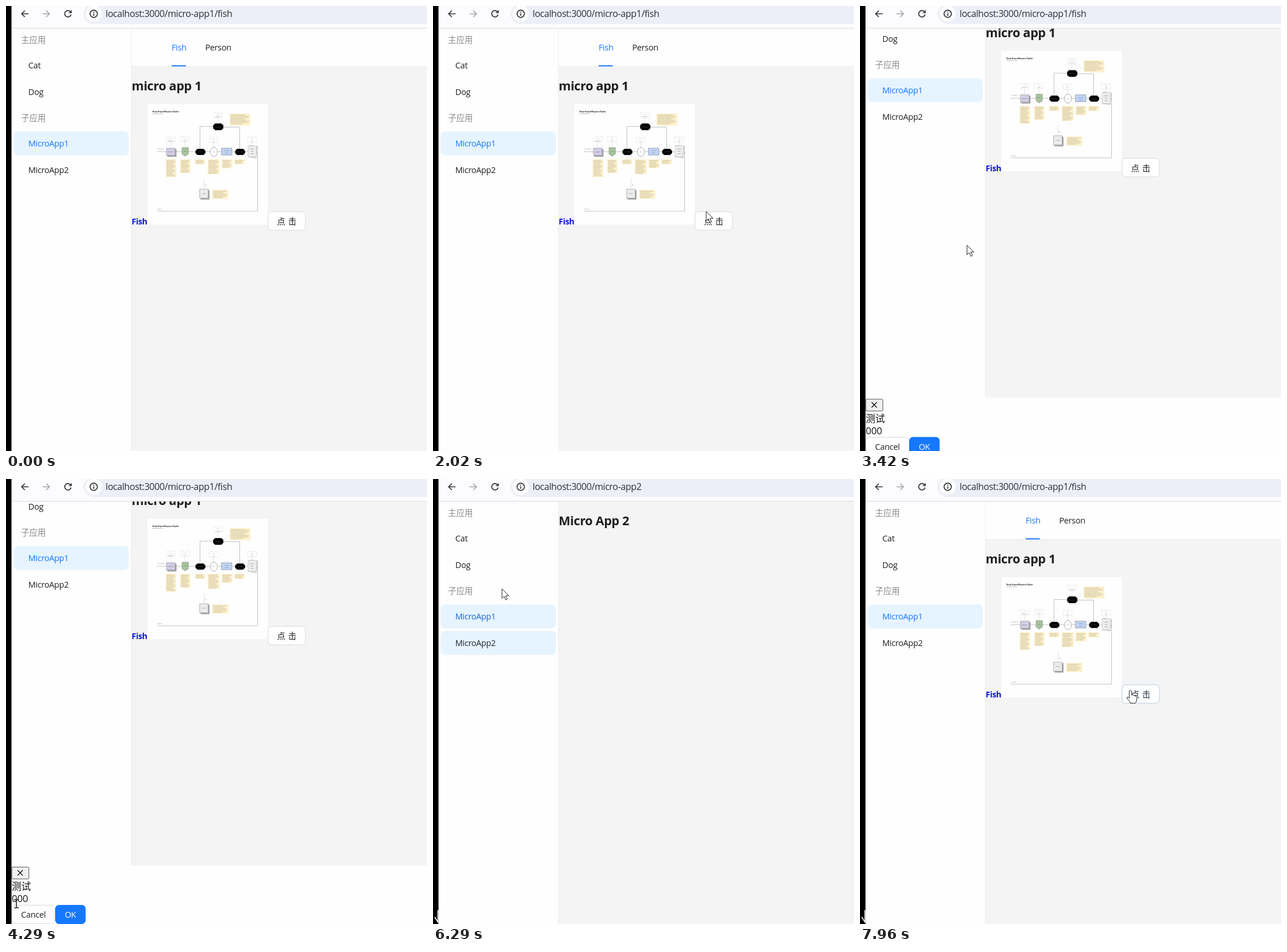
Recreate the animation shown at these times as an HTML page. Size 727 by 770 pixels, loop 8000 ms.

```html
<!DOCTYPE html>
<html lang="zh">
<head>
<meta charset="utf-8">
<style>
html, body { margin: 0; width: 100%; height: 100%; overflow: hidden; background: #fff; }
svg { display: block; width: 727px; height: 770px; }
text { font: 14.3px "Open Sans", "Noto Sans CJK SC", "Noto Sans CJK", sans-serif; letter-spacing: -.02em; fill: #1f1f1f; white-space: pre; }
.cjk { letter-spacing: 0; }
.group { fill: #8c8c8c; letter-spacing: 0; }
.head { font-size: 21.4px; font-weight: 700; letter-spacing: -.016em; }
.url { font-size: 15.9px; letter-spacing: -.0245em; fill: #303236; }
.modal { font-size: 16.5px; letter-spacing: 0; fill: #111; }
.tiny { font: 1.9px "Liberation Sans", sans-serif; letter-spacing: 0; fill: #555; }
.icon { fill: none; stroke: #303236; stroke-width: 1.7; }
.mouse { fill: #fff; stroke: #222; stroke-width: 1; stroke-linejoin: round; }
</style>
</head>
<body>
<svg viewBox="0 0 727 770">
  <rect width="727" height="770" fill="#fefefe"/>
  <g id="page">
    <rect x="217" y="38" width="510" height="732" fill="#f4f4f4"/>
    <rect x="10" y="38" width="206" height="732" fill="#fefefe"/>
    <path d="M216.5 38V770" stroke="#ececec"/>
    <text class="group" x="26" y="64">主应用</text>
    <text class="group" x="26" y="199">子应用</text>
    <g id="menu"></g>
    <g id="app1">
      <rect x="217" y="38" width="510" height="66" fill="#fefefe"/>
      <path d="M217 104.5H727" stroke="#ededed"/>
      <text x="286" y="77" style="fill:#1677ff">Fish</text>
      <text x="344" y="77">Person</text>
      <rect x="286" y="102.5" width="24.5" height="2" fill="#1677ff"/>
      <text class="head" x="217" y="146">micro app 1</text>
      <text x="217" y="378" style="fill:#0c14e0;font-weight:700;font-size:14px">Fish</text>
      <rect x="244" y="170" width="208" height="208" fill="#fefefe"/>
      <g id="chart"></g>
      <rect id="wave" fill="none" stroke="#1677ff"/>
      <rect id="btn" x="452.5" y="356" width="64.5" height="32" rx="6.5" fill="#fff"/>
      <text id="btnText" x="468" y="378" style="letter-spacing:4.9px">点击</text>
    </g>
    <text id="app2" class="head" x="217" y="80">Micro App 2</text>
    <g id="modal" transform="translate(0 101)">
      <rect x="10" y="669" width="717" height="101" fill="#fefefe"/>
      <rect x="10" y="671.5" width="29.5" height="20.5" rx="2" fill="#efefef" stroke="#555"/>
      <path d="M20 677l9 9m0-9l-9 9" stroke="#111" stroke-width="1.4"/>
      <text class="modal" x="10" y="711">测试</text>
      <text class="modal" x="10" y="732">000</text>
      <rect x="9.5" y="737.5" width="75" height="32" rx="6.5" fill="#fff" stroke="#d9d9d9"/>
      <text x="26" y="759">Cancel</text>
      <rect x="85" y="737" width="52.5" height="33" rx="6.5" fill="#1677ff"/>
      <text x="101.5" y="759" style="fill:#fff">OK</text>
    </g>
  </g>
  <rect width="727" height="38" fill="#fcfcfe"/>
  <path d="M10 38.5H727" stroke="#d9dce1"/>
  <rect x="134" y="-4" width="620" height="35" rx="17.5" fill="#eceff8"/>
  <circle cx="151.500" cy="13.500" r="14" fill="#fdfdfe"/>
  <circle id="hot" cx="107" cy="13.500" r="17.500" fill="#e6e7ea"/>
  <path class="icon" d="M39 13.500H27M32.500 8L27 13.500 32.500 19"/>
  <path class="icon" style="stroke:#a3a5a8" d="M63 13.500H75M69.500 8L75 13.500 69.500 19"/>
  <path class="icon" d="M111.700 10.400A5.600 5.600 0 1 0 112.400 14.800M112.700 7.500V11.500H108.500"/>
  <circle class="icon" cx="151.500" cy="13.500" r="6.300"/>
  <path class="icon" d="M151.500 12.700V17M151.500 9.800V11.400"/>
  <text id="url" class="url" x="172" y="19"></text>
  <rect width="9.500" height="770" fill="#000"/>
  <path id="trail" d="M8.500 746V767M3 758L9 767.500" stroke="#fff" stroke-width="1.600" fill="none"/>
  <circle id="click" r="13" fill="#f1e82a" opacity=".8"/>
  <g id="mouse" class="mouse">
    <path id="arrow" d="M0 0V16.500L3.900 12.900 6.600 19.200 9.200 18 6.500 12H11.900Z"/>
    <path id="hand" d="M-2 1Q0-2 2 1V8Q4 6 5.500 8.500 7.500 7 8.500 10 10.500 9 11 11.500V16Q10.500 20 8 22H0Q-1 19-5.500 14-7 11-4.500 11L-2 13.500Z"/>
    <path id="beam" d="M-4-7H-1L0-6 1-7H4M0-6V6M-4 7H-1L0 6 1 7H4" style="stroke-width:1.600;fill:none"/>
  </g>
</svg>
<script>
const $ = id => document.getElementById(id);
const LOOP = 8000;
const clamp = v => Math.max(0, Math.min(1, v));
const ramp = (t, a, b) => clamp((t - a) / (b - a));
const ease = k => k * k * (3 - 2 * k);
const within = (t, a, b) => t >= a && t < b;
const mix = (a, b, k) => `rgb(${a.map((v, i) => Math.round(v + (b[i] - v) * k))})`;
const show = (id, on) => $(id).setAttribute('visibility', on ? 'inherit' : 'hidden');
const attrs = (id, o) => { for (const k in o) $(id).setAttribute(k, o[k]); };

const DARK = [31, 31, 31], BLUE = [22, 119, 255], HOVER = [64, 150, 255], LINE = [217, 217, 217];

// menu
const ITEMS = ['Cat', 'Dog', 'MicroApp1', 'MicroApp2'];
const TOPS = [82, 128, 217, 263];
$('menu').innerHTML = ITEMS.map((s, i) =>
  `<rect id="bg${i}" x="13.500" y="${TOPS[i]}" width="198.500" height="41.500" rx="8" fill="#e6f4ff"/>
   <text id="item${i}" x="38.500" y="${TOPS[i] + 26}">${s}</text>`).join('');

// pipeline drawing
const rect = (x, y, w, h, fill, line = 'none') =>
  `<rect x="${x}" y="${y}" width="${w}" height="${h}" fill="${fill}" stroke="${line}" stroke-width=".6"/>`;
const path = (d, line = '#999', fill = 'none', extra = '') =>
  `<path d="${d}" stroke="${line}" fill="${fill}" stroke-width=".6" ${extra}/>`;
const word = (x, y, s, style = '') => `<text class="tiny" x="${x}" y="${y}" style="${style}">${s}</text>`;
const mid = (x, y, s, fill = '#444') => word(x, y, s, `text-anchor:middle;fill:${fill}`);
const note = (x, y, w, h) => {
  let d = '';
  for (let r = 0; 2.5 + r * 2.2 < h - 1; r++)
    d += `M${x + 2} ${y + 2.5 + r * 2.2}h${(w - 4) * (.65 + .35 * Math.abs(Math.sin(r * 2.3 + x)))}`;
  return rect(x, y, w, h, '#fdf1cf') + path(d, '#a3966f', 'none', 'stroke-dasharray="2.500 .5"');
};
const label = (x, y, s) => rect(x - 7.5, y, 15, 9.5, '#fff', '#ddd') +
  mid(x, y + 3.5, 'Optional', '#aaa') + mid(x, y + 7.5, s) +
  path(`M${x} ${y + 9.5}v9`, '#aaa', 'none', 'stroke-dasharray="1 1"');
const pill = (x, y, w, h, s) =>
  path(`M${x + 3} ${y}h${w - 6}l3 3v${h - 6}l-3 3h${6 - w}l-3-3v${6 - h}z`, '#000', '#000') + mid(x + w / 2, y + h / 2 + .7, s, '#999');
const stack = (x, y, w, h, fill, s) => rect(x + 2, y + 2, w, h, '#aaa', '#888') +
  rect(x, y, w, h, fill, '#888') + mid(x + w / 2, y + h / 2 + .7, s);

$('chart').innerHTML = [
  word(253, 184, 'Nestjs Request/Response Pipeline', 'font-size:2.8px;font-weight:700;fill:#111'),
  word(253, 187, 'Request lifecycle flow', 'fill:#333'),
  word(261, 247.5, 'Client request'), word(261, 352, 'Response'),
  path('M260 252H426M434.500 252V355H261M335 247V208.500H358M375 209.500H403.500V248'),
  path('M342 299V317', '#999', 'none', 'stroke-dasharray="1 1"'),
  path('M375 207L386 197', '#bbb', 'none', 'stroke-dasharray="1 1"'),
  [[284.5, 226, 'Middleware'], [309, 225.500, 'Guard'], [358.500, 227, 'Pipe'], [425, 226.500, 'Filter'], [366, 184, 'Interceptor']]
    .map(a => label(...a)).join(''),
  stack(277, 246, 15, 12.5, '#d3cde7', 'Middleware'),
  path('M304 245H315V256L309.500 260 304 256Z', '#777', '#a7c59c'), mid(309.5, 251.5, 'Guard'),
  pill(327.5, 247.5, 16.5, 10, 'Interceptor'),
  `<ellipse cx="359" cy="252.500" rx="6" ry="8" fill="#fff" stroke="#888" stroke-width=".7"/>`, mid(359, 253, 'Pipe'),
  rect(372, 246, 18, 12, '#bfd5f7', '#777'), mid(381, 251, 'Controller'), mid(381, 255, 'handler'),
  pill(396, 247.5, 16.5, 10, 'Interceptor'),
  path('M420 241L435 243 432 263 418 261Z', '#aaa', '#ddd'),
  rect(418, 242, 14.5, 19, '#eee', '#bbb'), mid(425, 248, 'Exception'), mid(425, 252, 'filters'), mid(425, 256, 'global'),
  pill(358, 203.5, 17, 11, 'Interceptor'),
  stack(334.5, 317, 14.5, 15.5, '#ececec', 'Provider'),
  `<circle cx="345" cy="310" r=".8" fill="#888"/>`,
  [[386, 186, 36, 21], [275.5, 265, 18.5, 31], [300.5, 265, 18, 24], [326, 265, 18, 9], [348, 265, 21, 26],
   [372, 265, 19, 16], [394, 265, 18.5, 9], [356, 318, 28, 16]].map(a => note(...a)).join('')
].join('');

// pointer stops: time, x, y
const STOPS = [
  [210, 663, 764], [600, 380, 330], [1010, 105, 24], [1130, 111, 14], [1420, 111, 14],
  [1820, 441, 301], [2130, 484, 377], [2930, 484, 377], [3090, 239, 394], [3150, 233, 395], [3600, 159, 424],
  [3760, 159, 424], [3820, 161, 424], [4060, 161, 424], [4290, 18, 735], [4350, 18, 735], [4460, 4, 750],
  [4600, 12, 746], [4840, 63, 716], [5200, 227, 480], [5560, 152, 218], [5680, 152, 218],
  [5950, 119, 190], [6350, 119, 190], [6990, 125, 240], [7450, 125, 240], [7940, 467, 366], [8000, 467, 366]
];
function pointer(t) {
  let i = STOPS.findIndex(s => s[0] > t);
  if (i < 1) i = STOPS.length - 1;
  const a = STOPS[i - 1], b = STOPS[i], k = ease(ramp(t, a[0], b[0]));
  return [a[1] + (b[1] - a[1]) * k, a[2] + (b[2] - a[2]) * k];
}

function draw(t) {
  const second = within(t, 6250, 7370);
  const loading = within(t, 1420, 1590);
  const scroll = second || t > 6250 ? 0 : 101 * ease(ramp(t, 3290, 3450));
  const first = !second && !loading;
  $('page').setAttribute('transform', `translate(0 ${-scroll})`);
  $('url').textContent = 'localhost:3000/micro-app' + (second ? '2' : '1/fish');
  show('app1', first);
  show('app2', second);
  show('modal', scroll > 0);
  show('trail', t >= 4460);

  const [x, y] = pointer(t);
  const py = y + scroll;
  const over = x > 13 && x < 212 ? TOPS.findIndex(v => py >= v && py < v + 41.5) : -1;
  const onBtn = first && x > 452 && x < 518 && py > 356 && py < 389;
  const beam = scroll > 50 && x < 45 && y > 697 && y < 737;

  // menu selection
  const out = ramp(t, 6240, 6500), back = ramp(t, 7370, 7620);
  const sel = { 2: 1 - out + back, 3: ramp(t, 6270, 6520) - back };
  const glow = { 2: 1 - ramp(t, 6290, 6500) + ramp(t, 7200, 7300), 3: ramp(t, 6110, 6200) - ramp(t, 7370, 7600) };
  ITEMS.forEach((s, i) => {
    const g = clamp(glow[i] || 0), hover = over === i && g < .1;
    attrs('bg' + i, { fill: hover ? '#f0f0f0' : '#e6f4ff', opacity: hover ? 1 : g });
    $('item' + i).style.fill = mix(DARK, BLUE, clamp(sel[i] || 0));
  });

  // button hover and click wave
  const heat = ramp(t, 2060, 2260) - ease(ramp(t, 3000, 3260)) + ramp(t, 7930, 8130);
  const ring = ramp(t, 2400, 2800), spread = 6 * (1 - (1 - ring) ** 3);
  attrs('btn', { stroke: mix(LINE, HOVER, Math.min(1, heat * 1.25)) });
  $('btnText').style.fill = mix(DARK, HOVER, heat);
  attrs('wave', {
    x: 452 - spread / 2, y: 355.5 - spread / 2, width: 65.5 + spread, height: 33 + spread, rx: 7 + spread / 2,
    'stroke-width': spread, opacity: .2 * (1 - ramp(t, 2400, 3300)) ** 1.3
  });
  show('wave', first && within(t, 2400, 3300));

  // pointer
  show('hot', within(t, 1090, 1480));
  show('mouse', t >= 210);
  const hand = onBtn || over >= 0;
  show('hand', hand);
  show('beam', beam);
  show('arrow', !hand && !beam);
  $('mouse').setAttribute('transform', `translate(${x} ${y})`);
  attrs('click', { cx: x - 1, cy: y - 1 });
  show('click', within(t, 1240, 1360) || within(t, 2360, 2480) || within(t, 6110, 6240) || within(t, 7200, 7330));
}

function tick() {
  draw(performance.now() % LOOP);
  requestAnimationFrame(tick);
}
tick();
</script>
</body>
</html>
```
